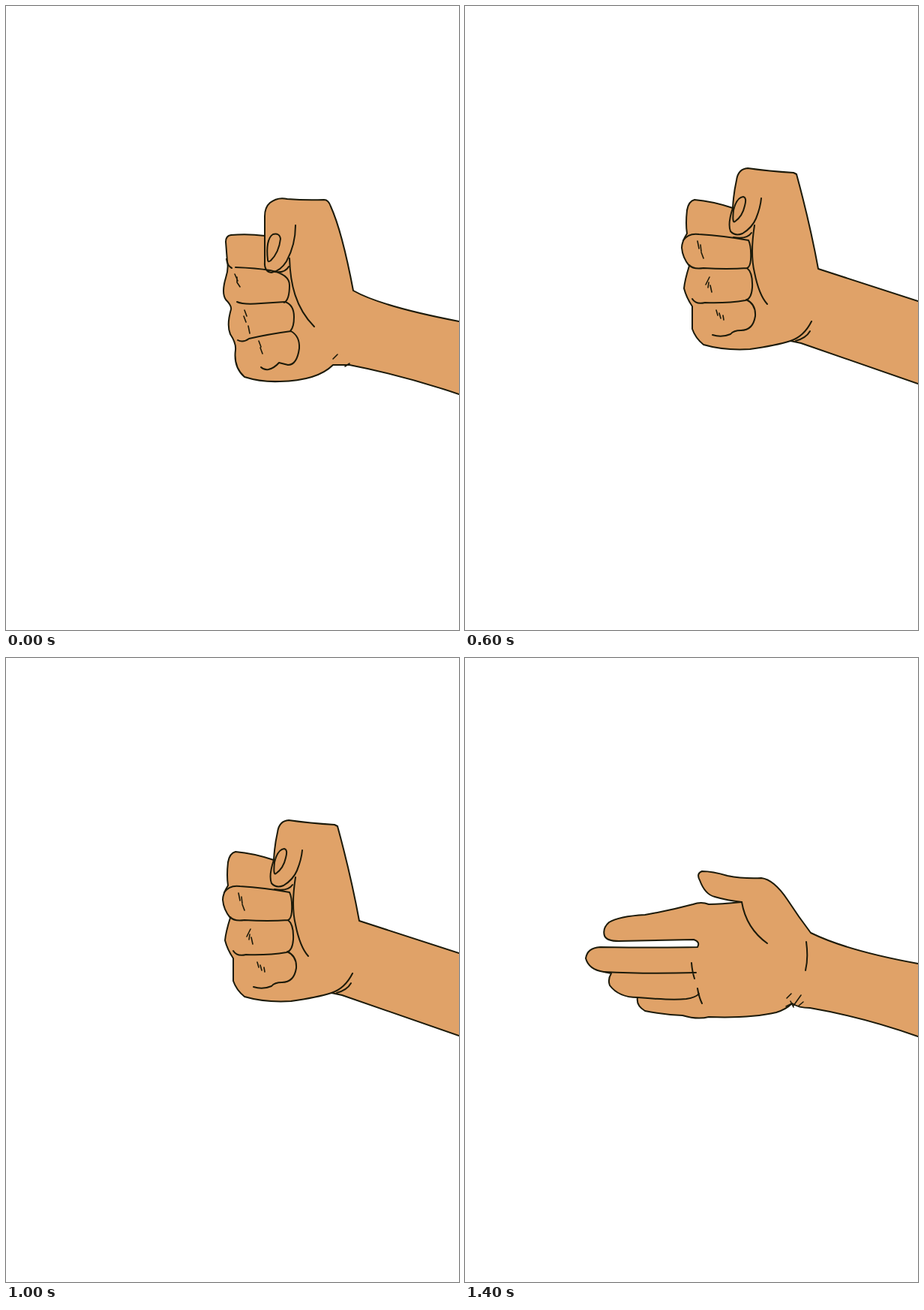
These frames come from a looping animation (604 px wide and 831 px high, 3400 ms). An HTML page:

```html
<!DOCTYPE html>
<html lang="en">
<head>
<meta charset="utf-8">
<title>Hand game</title>
<style>
  html, body { margin: 0; width: 100%; height: 100%; overflow: hidden; background: #fff; }
  svg { display: block; width: 100%; height: 100%; }
  path { stroke: #1c1a0a; stroke-width: 2; stroke-linejoin: round; stroke-linecap: round; }
  #skin { fill: #e0a268; }
  #creases { fill: none; }
  #marks { fill: none; stroke-width: 1.6; }
</style>
</head>
<body>
<svg viewBox="0 0 604 831">
  <g id="hand"><path id="skin"/><path id="creases"/><path id="marks"/></g>
</svg>
<script>
const low = {
  skin: `M660 430L604 420Q500 400 463 379Q448 300 433 267Q430 258 424 258Q400 259 375 257
    Q362 254 352 262Q345 268 345 280V306Q322 303 300 305Q293 306 293 314L295 340
    Q297 350 293 362Q287 382 293 391Q301 399 300 404Q294 425 299 437Q307 449 306 458
    Q303 481 318 494Q340 501 365 500Q415 499 436 478L458 478Q530 492 604 517L660 535`,
  creases: `M294 337Q295 346 301 349M306 348Q334 349 352 352Q378 357 378 372Q378 391 371 395
    M308 394Q316 398 340 396L372 394Q384 398 384 414Q384 428 379 433
    M309 445Q316 449 324 443Q350 437 380 433Q392 440 391 456Q388 478 376 478L364 475
    Q358 482 350 484Q344 485 340 481M345 306V340Q344 354 354 355Q366 353 374 340Q386 318 386 292
    M349 338C347 322 349 308 356 304Q365 302 366 310Q364 328 353 339Q349 342 349 338
    M378 336C379 370 386 402 411 427M377 347Q372 356 358 354`,
  marks: `M305 357l4 9M308 361v7l4 6M318 405l3 8M317 413l3 8M323 426l2 10M337 446l3 8M339 455l3 8
    M436 470l6-6M452 480l6-4`
};
const mid = {
  skin: `M660 411L604 393L471 350Q460 290 442 224L438 222Q405 220 377 216Q364 217 362 232
    Q358 250 357 269Q330 260 306 258Q298 260 296 272Q294 290 296 303Q289 314 289 322
    Q290 335 299 346Q293 365 292 376Q295 388 303 400V430Q307 442 318 451Q345 459 380 457
    Q415 452 434 446L448 449L604 503L660 523`,
  creases: `M291 312Q298 302 312 304Q345 306 378 312Q382 320 381 338Q380 348 376 349
    M299 345Q304 351 318 349Q350 351 376 349Q384 355 383 375Q382 390 374 392
    Q350 396 320 395Q308 398 303 390M375 391Q388 397 387 413Q384 432 368 432
    Q358 432 354 437Q342 442 330 438M357 269Q350 290 354 300Q360 307 370 303
    Q383 295 388 283Q394 268 395 256M358 272Q362 255 371 254Q376 255 373 266
    Q370 280 360 287Q356 290 358 272M386 292Q380 330 386 355Q392 385 403 397
    M382 302Q376 311 358 308M434 446Q452 440 462 420M441 446Q455 442 460 433`,
  marks: `M310 313l2 10M314 318l1 9M315 328l3 8M326 361l-5 10M325 368l-1 7M327 372l2 9
    M335 405l2 7M339 409l2 7M344 412l1 6`
};
const high = {
  skin: `M660 383L604 347L482 272Q483 225 476 162Q474 148 462 144Q430 138 402 129
    Q398 129 394 137Q386 152 379 171Q355 162 338 151Q333 149 328 155Q318 180 313 198
    Q313 206 317 211Q309 235 309 246Q313 260 318 265Q312 285 313 296Q316 306 322 314
    L317 341Q322 352 332 359Q360 368 390 367Q430 367 446 363L452 364L604 452L660 484`,
  creases: `M316 212Q320 201 324 197M334 197Q355 205 372 211Q392 213 395 218Q398 232 395 247
    Q400 270 395 284Q392 289 388 290M319 263Q323 250 330 246Q355 250 384 248
    M322 314Q326 300 330 289Q360 290 388 291Q399 295 398 312Q397 328 386 331L380 330
    M380 325Q365 328 357 333Q345 335 336 332M365 331Q358 338 352 342
    M379 171Q369 190 371 203Q374 211 384 210Q400 208 408 198Q418 190 419 180
    M441 178Q434 191 425 193L416 190M384 175Q386 163 396 162Q405 163 403 172
    Q398 184 388 188Q380 190 376 191M405 204Q396 215 397 240Q400 270 405 293
    M373 211Q390 220 400 210M446 363L460 361`,
  marks: `M333 161l-3 8M332 167l2 7M339 209l-4 13M340 217l-1 8M341 227l2 8M348 261l-3 9l5 2v7
    M361 297l-3 9l5 3l2 10M461 334l-7 9M466 340l-8 11`
};
const peak = { ...high, turn: "rotate(3 604 400)" };
const smear = {
  skin: `M660 387L604 359Q550 335 490 296Q483 290 478 295Q474 303 469 316Q471 280 473 240
    Q480 200 480 185Q479 165 472 157Q455 146 427 141Q420 139 414 146Q396 172 376 209
    Q376 195 386 175Q375 163 364 157Q350 152 344 150Q338 158 338 168L341 165
    Q328 230 320 295Q315 370 314 450Q316 480 319 492Q322 500 328 499
    Q365 494 410 482Q430 471 447 467L604 508L660 523`
};
const paper = {
  skin: `M660 418L604 407Q510 390 461 366Q445 345 430 322Q412 295 395 293Q370 294 350 290
    Q330 284 316 284Q308 287 313 296Q320 315 333 318Q350 323 369 325Q340 328 325 328
    Q315 324 304 328Q270 337 240 342Q205 344 192 352Q183 360 186 370Q189 377 205 377
    Q260 376 305 375Q314 378 310 385Q260 386 180 385Q163 386 161 400Q165 415 185 418
    L195 420Q190 428 193 436Q205 452 230 452Q228 463 240 470Q265 475 290 476
    Q310 482 325 478Q380 480 415 472Q428 468 436 460Q445 466 460 466Q530 478 604 504L660 524`,
  creases: `M185 418Q240 421 308 419M230 452Q275 456 295 454Q308 452 312 447
    M302 406Q303 418 306 427M310 440Q312 452 316 460M369 325Q375 360 403 380
    M455 378Q458 400 454 416`,
  marks: "M429 453l6-6M436 460l-8 4M434 457l4 8M438 463l10-14M445 463l6-5"
};

const step = 100, loop = 3400;
const poses = [
  low, mid, high, peak, smear,
  low, mid, high, smear,
  low, mid, high, peak, smear,
  paper
];
const el = id => document.getElementById(id);
const parts = ["skin", "creases", "marks"];
let shown;

function draw(time) {
  const index = Math.floor((time % loop) / step);
  const pose = poses[Math.min(index, poses.length - 1)];
  if (pose !== shown) {
    for (const id of parts) el(id).setAttribute("d", pose[id] || "");
    el("hand").setAttribute("transform", pose.turn || "");
    shown = pose;
  }
}

const start = performance.now();
function tick() {
  draw(performance.now() - start);
  requestAnimationFrame(tick);
}
tick();
</script>
</body>
</html>
```
